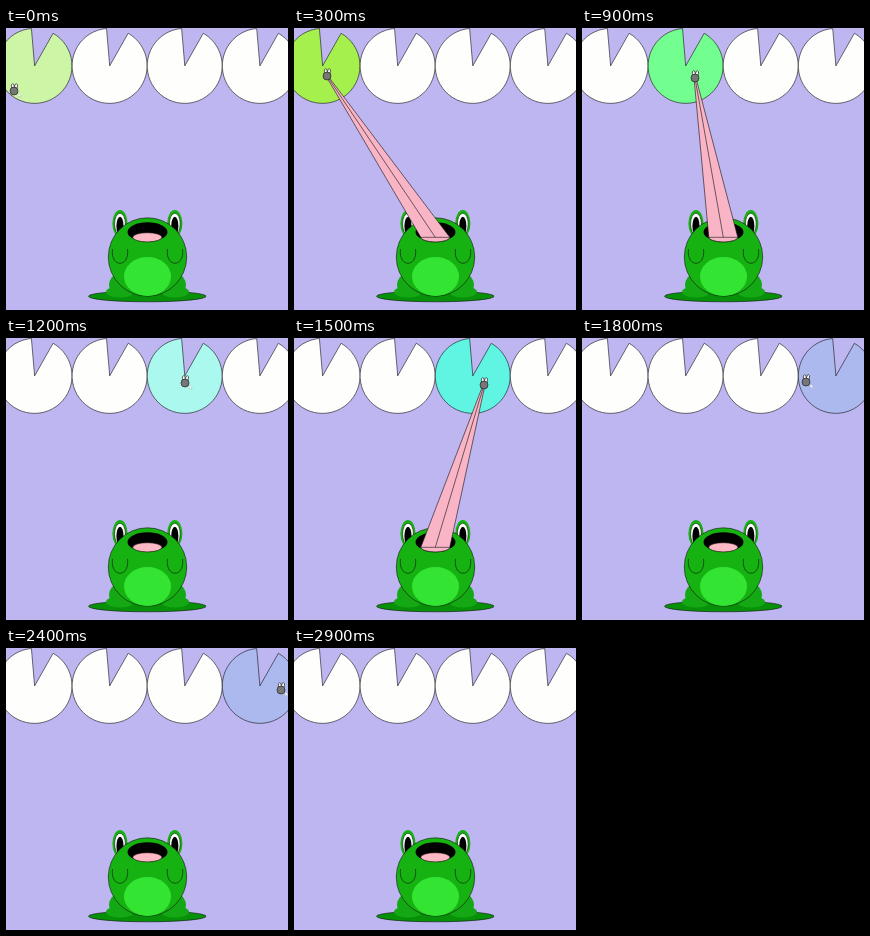
Recreate the animation shown at these times as an HTML page. Size 282 by 282 pixels, loop 3 s.

```html
<!DOCTYPE html>
<html lang="en">
<head>
<meta charset="utf-8">
<title>Frog and fly</title>
<style>
html, body { margin: 0; width: 100%; height: 100%; overflow: hidden; background: #bdb6f0; }
svg { display: block; width: 100vw; height: 100vh; }
.line { stroke: #111; stroke-width: .6; }
</style>
</head>
<body>
<svg viewBox="0 0 282 282">
  <rect width="282" height="282" fill="#bdb6f0"/>
  <g id="pads"></g>

  <ellipse class="line" cx="141.3" cy="268.3" rx="58.8" ry="5.5" fill="#079109"/>
  <g fill="#14a814">
    <ellipse cx="113" cy="257" rx="10" ry="11"/>
    <ellipse cx="170" cy="257" rx="10" ry="11"/>
    <ellipse cx="114" cy="264" rx="14" ry="5.5"/>
    <ellipse cx="169" cy="264" rx="14" ry="5.5"/>
  </g>
  <g id="eyes"></g>
  <circle class="line" cx="141.5" cy="229" r="39.2" fill="#16b212"/>
  <ellipse cx="141.5" cy="248.5" rx="23.5" ry="19.5" fill="#33e433"/>
  <path class="line" fill="none" d="M106.5 221C104 240 124 240 121.5 221M161.5 221C159 240 179 240 176.5 221"/>
  <ellipse cx="141.5" cy="204" rx="20" ry="9.7"/>
  <ellipse class="line" cx="141.3" cy="209.3" rx="14.5" ry="4.6" fill="#ffb9c5"/>

  <g id="tongue" class="line" fill="#f9b5c6" stroke-linejoin="round">
    <path id="flesh"/>
    <path id="crease" fill="none"/>
  </g>
  <g id="fly">
    <path id="pointer" d="M0 0V4.2L1.1 3.3 2 5 2.8 4.6 2 3H3.2Z" fill="#fff" stroke="#888" stroke-width=".25"/>
    <g class="line">
      <ellipse cx="-.5" cy="-4.6" rx="1.5" ry="2.8" fill="#f4f4f4" transform="rotate(-8)"/>
      <ellipse cx="1.2" cy="-4.8" rx="1.5" ry="2.8" fill="#f4f4f4" transform="rotate(10)"/>
      <circle r="4" fill="#777"/>
    </g>
  </g>
</svg>
<script>
const LOOP = 3000, STEP = 100, PITCH = 75.1, R = 37.5;
const $ = id => document.getElementById(id);
const hover = ['#cdf5a6', '#aefabd', '#abf8ee', '#acb9ee'];
const pressed = ['#a5f04c', '#73ff8f', '#5ff5e2', '#6688f6'];

// time, x, y
const path = [
  [0, 8, 63], [200, 27, 50], [300, 33, 48], [400, 44, 49], [500, 72, 49],
  [600, 96, 48], [900, 113, 50], [1000, 126, 49], [1200, 179, 45],
  [1500, 190, 47], [1700, 207, 45], [1800, 224, 44], [2100, 237.5, 46],
  [2300, 258, 44], [2500, 292, 40], [LOOP, 292, 40]
];

function make(parent, tag, attrs) {
  const el = document.createElementNS('http://www.w3.org/2000/svg', tag);
  for (const key in attrs) el.setAttribute(key, attrs[key]);
  return parent.appendChild(el);
}

const pads = hover.map((_, i) => make($('pads'), 'path', {
  class: 'line',
  transform: `translate(${28.6 + PITCH * i} 37.9)`,
  d: `M0 0L18.5 -32.6A${R} ${R} 0 1 1 -3.2 -37.4Z`
}));

for (const cx of [114, 168.8]) {
  make($('eyes'), 'ellipse', { cx, cy: 195.5, rx: 7.6, ry: 13.5, fill: '#16b212' });
  make($('eyes'), 'ellipse', { cx, cy: 196, rx: 5.4, ry: 10.8, fill: '#fff', class: 'line' });
  make($('eyes'), 'ellipse', { cx, cy: 198, rx: 3.6, ry: 9.2, fill: '#000' });
}

function flyAt(t) {
  const i = path.findIndex(p => p[0] > t);
  const [a, b] = [path[i - 1], path[i]];
  const k = (t - a[0]) / (b[0] - a[0]);
  return [a[1] + (b[1] - a[1]) * k, a[2] + (b[2] - a[2]) * k];
}

function draw(time) {
  const t = Math.floor((time % LOOP) / STEP) * STEP;
  const [x, y] = flyAt(t);
  const beat = t % 600;
  const press = t < 2400 && beat >= 200 && beat < 400;
  const active = x < 284 ? Math.floor((x + 9) / PITCH) : -1;

  pads.forEach((pad, i) =>
    pad.setAttribute('fill', i !== active ? '#fefefc' : (press ? pressed : hover)[i]));

  $('tongue').style.display = press ? '' : 'none';
  $('flesh').setAttribute('d',
    `M126.8 209.3L${x - 1} ${y}H${x + 1}L155.8 209.3A14.5 4.6 0 0 1 126.8 209.3Z`);
  $('crease').setAttribute('d', `M126.8 209.3H155.8M141.3 209.3L${x} ${y}`);

  $('fly').setAttribute('transform', `translate(${x} ${y})`);
  $('pointer').style.display = press ? 'none' : '';
  $('pointer').setAttribute('transform', 'translate(4.2 1.8)');
}

const start = performance.now();
function tick() {
  draw(performance.now() - start);
  requestAnimationFrame(tick);
}
tick();
</script>
</body>
</html>
```
